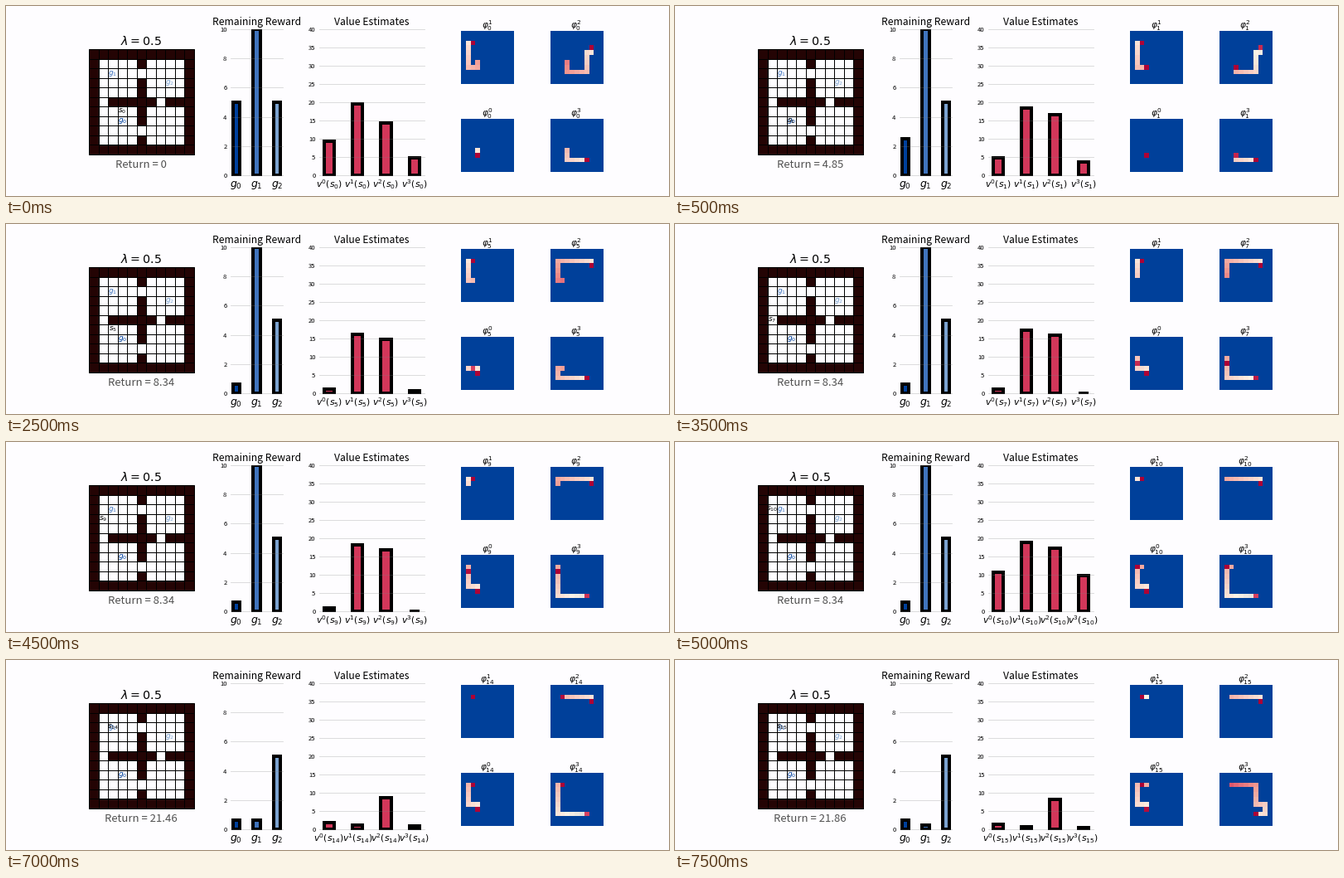
Recreate the animation shown at these times as a matplotlib script. Size 800 by 229 pixels, loop 8 s.

```python
import numpy as np
import matplotlib.pyplot as plt
from functools import lru_cache
from matplotlib.animation import FuncAnimation
from matplotlib.colors import LinearSegmentedColormap
from matplotlib.patches import Rectangle

W, H, DPI = 800, 229, 100
PX = 72 / DPI
PAPER = "#fefdff"

# Four rooms with three rewards that halve at every visit
N = 11
GAMMA, LAM = 0.97, 0.5
STEPS = 16
START = (6, 3)
GOALS = [(7, 3), (2, 2), (3, 8)]
REWARDS = [5.0, 10.0, 5.0]
TARGETS = GOALS + [(8, 7)]
DOORS = [(2, 5), (8, 5), (5, 1), (5, 7)]
LEFT, UP, RIGHT, DOWN, STAY = (0, -1), (-1, 0), (0, 1), (1, 0), (0, 0)


def is_wall(cell):
    edge = any(v in (0, N - 1) for v in cell)
    return edge or (5 in cell and cell not in DOORS)


def step(cell, move):
    nxt = (cell[0] + move[0], cell[1] + move[1])
    return cell if is_wall(nxt) else nxt


@lru_cache(None)
def distances(target):
    dist, queue = {target: 0}, [target]
    for cell in queue:
        for move in (LEFT, UP, RIGHT, DOWN):
            nxt = step(cell, move)
            if nxt not in dist:
                dist[nxt] = dist[cell] + 1
                queue.append(nxt)
    return dist


def detour(policy, cell):
    """Cells a policy passes through before it heads for its target."""
    west, south = cell[1] < 3, cell[0] > 5
    if policy == 2:
        return [(2, 2)] if west else [(8, 3), (8, 7), (4, 8)] if south else []
    if policy == 3:
        return [(8, 1)] if west else [(8, 3)] if south else [(8, 9)]
    return []


def walk(policy, cell):
    path = [cell]
    for target in detour(policy, cell) + [TARGETS[policy]]:
        dist = distances(target)
        while path[-1] != target:
            options = [step(path[-1], m) for m in (LEFT, UP, RIGHT, DOWN)]
            path.append(min(options, key=dist.get))
    return path


@lru_cache(None)
def representation(policy, state, move):
    """Diminishing, discounted occupancy: one free move, then the policy."""
    phi, visits = np.zeros((N, N)), np.zeros((N, N))
    path = [state] + walk(policy, step(state, move))
    for t, cell in enumerate(path):
        phi[cell] += GAMMA ** t * LAM ** visits[cell]
        visits[cell] += 1
    end = path[-1]
    phi[end] += GAMMA ** len(path) * LAM ** visits[end] / (1 - GAMMA * LAM)
    return phi


def simulate():
    """Act greedily on the best policy value at every step."""
    state, left, total, history = START, list(REWARDS), 0, []
    moves = [STAY, UP, LEFT, RIGHT, DOWN]
    for t in range(STEPS):
        if state in GOALS:
            i = GOALS.index(state)
            total += GAMMA ** t * left[i]
            left[i] *= LAM
        q = np.array([[sum(r * representation(p, state, m)[g] for r, g in zip(left, GOALS))
                       for m in moves] for p in range(4)])
        move = moves[int(np.argmax(q.max(axis=0).round(9)))]
        phis = [representation(p, state, move) for p in range(4)]
        history.append((state, total, list(left), q.max(axis=1), phis))
        state = step(state, move)
    return history


HISTORY = simulate()

fig = plt.figure(figsize=(W / DPI, H / DPI), dpi=DPI, facecolor=PAPER)
ax = fig.add_axes([0, 0, 1, 1])
ax.axis("off")


def label(x, y, s, size, color="black", ha="center", va="baseline", **kw):
    return ax.text(x, y, s, fontsize=size * PX, color=color, ha=ha, va=va, **kw)


def sans(*args, **kw):
    return label(*args, family="Noto Sans CJK JP", **kw)


# Maze
GX, GY, CELL = 100.2, 52.3, 11.5
GOAL_COLORS = ["#00409c", "#4074bd", "#7ba2d0"]


def center(cell):
    return GX + (cell[1] + 0.5) * CELL, GY + (cell[0] + 0.5) * CELL


for r, c in np.ndindex(N, N):
    ax.add_patch(Rectangle((GX + c * CELL, GY + r * CELL), CELL, CELL, ec="black",
                           lw=PX, fc="#240404" if is_wall((r, c)) else PAPER))

label(163.2, 47.2, r"$\lambda = 0.5$", 14.3)
for i, goal in enumerate(GOALS):
    label(*center(goal), f"$g_{i}$", 9, GOAL_COLORS[i], va="center")
agent = label(0, 0, "", 9, va="center")
returns = sans(163, 195, "", 13.1, color="#505050")

# Bar charts
TOP, BASE = 28, 204


def chart(x0, x1, title, top, tick, centers, width, colors):
    sans((x0 + x1) / 2, 22.8, title, 12.2)
    for v in range(0, top + 1, tick):
        y = BASE - (BASE - TOP) * v / top
        ax.plot([x0, x1], [y, y], color="#808080", alpha=0.33, lw=0.8 * PX, zorder=4)
        sans(x0 - 4.5, y, str(v), 7.7, ha="right", va="center_baseline")
    clip = Rectangle((x0, TOP), x1 - x0, BASE - TOP + 0.5, transform=ax.transData)
    bars = []
    for cx, color in zip(centers, colors):
        bar = Rectangle((cx - width / 2, BASE), width, 0, fc=color, ec="black",
                        lw=4 * PX, zorder=3)
        ax.add_patch(bar)
        bar.set_clip_path(clip)
        bars.append(bar)
    return bars


def set_bars(bars, values, top):
    for bar, v in zip(bars, values):
        h = (BASE - TOP) * v / top
        bar.set_y(BASE - h)
        bar.set_height(h)


REWARD_X = 277.8 + 24.5 * np.arange(3)
VALUE_X = 389.8 + 34.3 * np.arange(4)
reward_bars = chart(271, 334.2, "Remaining Reward", 10, 2, REWARD_X, 8.5, GOAL_COLORS)
value_bars = chart(378, 505.2, "Value Estimates", 40, 5, VALUE_X, 12.3, ["#d2375a"] * 4)
for i, x in enumerate(REWARD_X):
    label(x, 217.8, f"$g_{i}$", 12.5)
value_labels = [label(x, 219.3, "", 10.7) for x in VALUE_X]

# Occupancy maps
cmap = LinearSegmentedColormap.from_list("occupancy", [
    (0, "#00409a"), (0.5, "#fdf3e6"), (0.7, "#f2968f"), (0.85, "#d84463"), (1, "#ac0336")])
SIDE = 63.4
CORNERS = [(549, 137), (549, 31), (656.5, 31), (656.5, 137)]
maps, map_titles = [], []
for x, y in CORNERS:
    maps.append(ax.imshow(np.zeros((N, N)), cmap=cmap, vmin=0, vmax=1, aspect="auto",
                          interpolation="nearest", extent=(x, x + SIDE, y + SIDE, y)))
    map_titles.append(label(x + SIDE / 2, y - 4.5, "", 10.5))

ax.set_xlim(0, W)
ax.set_ylim(H, 0)


def update(t):
    state, total, left, values, phis = HISTORY[t]
    agent.set_position(center(state))
    agent.set_text(f"$s_{{{t}}}$")
    returns.set_text(f"Return = {round(total, 2):g}")
    set_bars(reward_bars, left, 10)
    set_bars(value_bars, values, 40)
    for i, phi in enumerate(phis):
        value_labels[i].set_text(f"$v^{i}(s_{{{t}}})$")
        map_titles[i].set_text(rf"$\varphi^{i}_{{{t}}}$")
        maps[i].set_data(phi / phi.max())
    return []


anim = FuncAnimation(fig, update, frames=STEPS, interval=500, repeat=True,
                     repeat_delay=0, blit=False)
plt.show()
```
